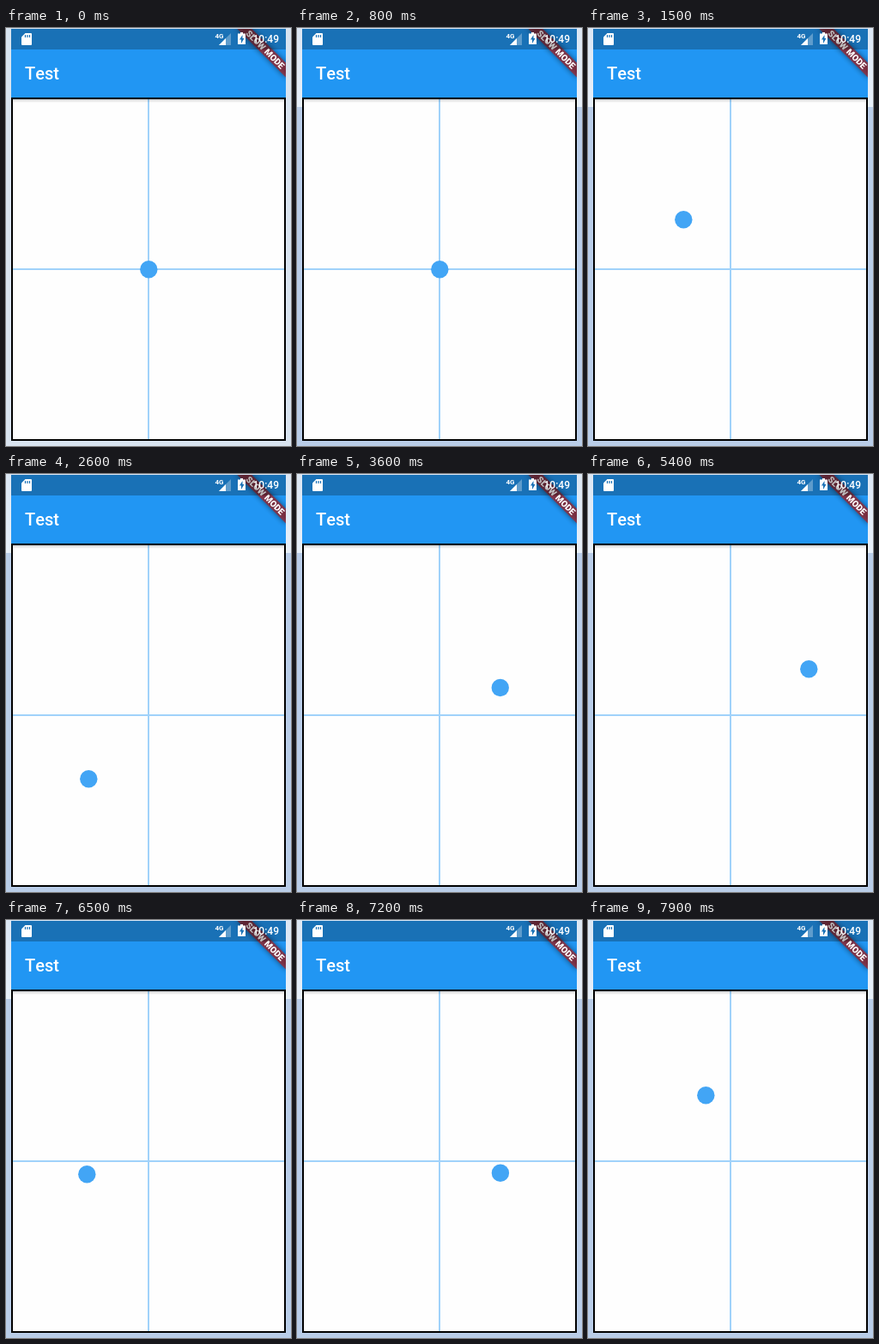
These frames come from a looping animation (332x487 px, 8 s). An HTML page:

```html
<!DOCTYPE html>
<html lang="en">
<head>
<meta charset="utf-8">
<style>
  html, body { margin: 0; width: 100%; height: 100%; overflow: hidden; }
  svg { display: block; width: 332px; height: 487px; font-family: Roboto, sans-serif; font-kerning: none; fill: #fff; }
</style>
</head>
<body>
<svg viewBox="0 0 332 487">
  <defs>
    <clipPath id="screen"><path d="M6 1h320v480H6z"/></clipPath>
    <filter id="blur" x="-20%" y="-80%" width="140%" height="260%"><feGaussianBlur stdDeviation="3"/></filter>
    <linearGradient id="shade" x2="0" y2="1">
      <stop stop-color="#000" stop-opacity=".18"/><stop offset="1" stop-color="#000" stop-opacity="0"/>
    </linearGradient>
    <linearGradient id="gloss" x2="0" y2="1">
      <stop stop-color="#dce7f4"/><stop offset="1" stop-color="#e8f0fa"/>
    </linearGradient>
  </defs>

  <rect id="desk" width="332" height="487"/>
  <rect id="deskTop" width="332" height="92" fill="url(#gloss)"/>

  <g clip-path="url(#screen)">
    <path d="M6 81h320v400H6z" fill="#fefefe"/>
    <path d="M165 83h2v396h-2zM8 280h316v2H8z" fill="#a0d2fa"/>
    <rect x="7" y="82" width="318" height="398" fill="none" stroke="#000" stroke-width="2"/>
    <path d="M8 83h316v4H8z" fill="url(#shade)"/>
    <path d="M6 1h320v80H6z" fill="#2196f3"/>
    <text x="22" y="60" font-size="20" font-weight="500">Test</text>

    <!-- corner ribbon -->
    <g transform="translate(326 1) rotate(45)">
      <rect x="-40" y="28" width="80" height="12" fill="#000" opacity=".5" filter="url(#blur)"/>
      <rect x="-40" y="28" width="80" height="12" fill="#b71c1c" fill-opacity=".63"/>
      <text y="37.6" font-size="10.2" font-weight="900" text-anchor="middle">SLOW MODE</text>
    </g>

    <!-- status bar -->
    <path d="M6 1h320v24H6z" opacity=".25" fill="#000"/>
    <path d="M22.5 6H29q1 0 1 1v12q0 1-1 1H19q-1 0-1-1v-8.500z"/>
    <path d="M22.500 8v3M25 8v3M27.500 8v3" stroke="#1971b6" stroke-width="1.200"/>
    <text x="243.500" y="12" font-size="8" font-weight="700">4G</text>
    <path d="M262 6v14h-14z" opacity=".3"/>
    <path d="M256 12v8h-8z"/>
    <path d="M273 5h3v1.500h3V19h-9V6.500h3z"/>
    <path d="M275.500 8v4h2l-3.500 6v-4.500h-2z" fill="#1971b6"/>
    <text x="318" y="17" font-size="12" font-weight="500" text-anchor="end">10:49</text>
  </g>

  <circle id="ball" r="10.2" fill="#42a5f5"/>
</svg>
<script>
const LOOP = 8000, STEP = 100, WAKE = 800;

// Turning points of the drag: step, x, y.
const turns = [
  [8, 166, 281], [15, 111, 223], [19, 231, 189], [22, 219, 312], [24, 129, 360],
  [26, 96, 355], [32, 233, 341], [37, 224, 230], [42, 82, 201], [45, 92, 258],
  [47, 99, 319], [49, 249, 331], [52, 261, 318], [54, 257, 227], [57, 190, 181],
  [61, 102, 181], [65, 94, 296], [70, 212, 342], [74, 237, 238], [79, 137, 204],
];

const last = turns.length - 1;
const turn = i => turns[Math.max(0, Math.min(last, i))];

function slope(i, axis) {
  if (i <= 0 || i >= last) return 0;
  const before = turn(i - 1), after = turn(i + 1);
  return (after[axis] - before[axis]) / (after[0] - before[0]);
}

// Smooth Hermite curve through the turning points.
function ballAt(step, axis) {
  const i = turns.findLastIndex(t => t[0] <= step);
  if (i < 0 || i === last) return turn(i)[axis];
  const a = turn(i), b = turn(i + 1), span = b[0] - a[0];
  const u = (step - a[0]) / span, v = 1 - u;
  return a[axis] * v * v * (1 + 2 * u) + b[axis] * u * u * (1 + 2 * v)
    + span * u * v * (v * slope(i, axis) - u * slope(i + 1, axis));
}

const byId = id => document.getElementById(id);
const ball = byId("ball"), desk = byId("desk"), deskTop = byId("deskTop");

function draw() {
  const time = performance.now() % LOOP;
  const step = Math.floor(time / STEP);
  ball.setAttribute("cx", ballAt(step, 1) + 0.3);
  ball.setAttribute("cy", ballAt(step, 2) + 0.3);
  const awake = time >= WAKE;
  desk.setAttribute("fill", awake ? "#b9cde8" : "#d9e4f0");
  deskTop.setAttribute("visibility", awake ? "visible" : "hidden");
  requestAnimationFrame(draw);
}
draw();
</script>
</body>
</html>
```
